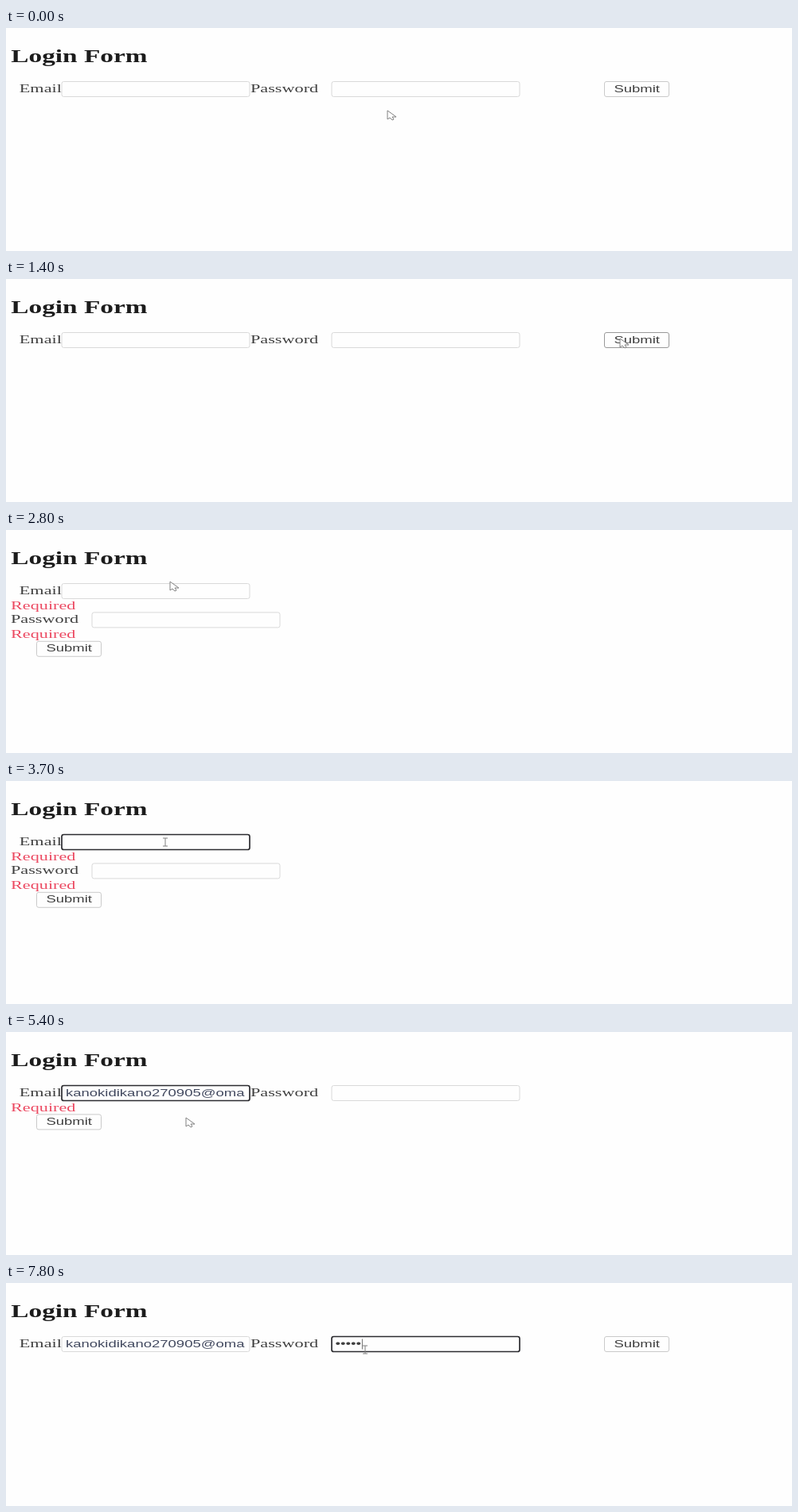
An HTML page with a canvas for the animation above (8 s loop, 987 by 281 pixels).

```html
<!DOCTYPE html>
<html lang="en">
<head>
<meta charset="utf-8">
<title>Login Form</title>
<style>
  html, body { margin: 0; width: 100%; height: 100%; overflow: hidden; background: #fefefe; }
  canvas { display: block; }
</style>
</head>
<body>
<canvas id="stage" width="987" height="281"></canvas>
<script>
const stage = document.getElementById('stage');
const ctx = stage.getContext('2d');
const LOOP = 8000, STEP = 100;
const SX = 1.388, SY = 0.92; // the whole page is shown wide
const SERIF = '"Liberation Serif", "Times New Roman", serif';
const SANS = '"Liberation Sans", Arial, sans-serif';
const TITLE = 'bold 24px ' + SERIF, BODY = '16px ' + SERIF, CONTROL = '13.333px ' + SANS;
const PAPER = '#fefefe', INK = '#404040', RED = '#ec4a62';

const LEFT = 6, TOP = 67.5, ROW = 18.2;
const BOX_H = 19, FIELD_W = 236, BUTTON_W = 81;
const EMAIL_X = 70, FIELD_GAP = 102;
const EMAIL = 'kanokidikano270905@oma';

const at = { hover: 1200, submit: 1900, email: 3200, fill: 4700, valid: 4800, password: 6200, typing: 7100 };

const home = { x: 479, y: 104 };
const move = (start, end, x, y) => ({ start, end, x, y });
const moves = [
  move(0, 800, 755, 97),
  move(1000, 1400, 771, 75),
  move(2400, 2600, 206, 65),
  move(2800, 3200, 200, 77),
  move(3700, 4400, 226, 108),
  move(5400, 5700, 416, 96),
  move(5900, 6400, 451, 84)
];
const arrowShape = new Path2D('M0 0V11L3 9L6 12L8 11L6 8H11Z');
const beamShape = new Path2D('M-3 -5H3M0 -5V5M-3 5H3');

function pointerAt(t) {
  return moves.reduce((p, m) => {
    const u = Math.min(1, Math.max(0, (t - m.start) / (m.end - m.start)));
    const k = u * u * (3 - 2 * u);
    return { x: p.x + (m.x - p.x) * k, y: p.y + (m.y - p.y) * k };
  }, home);
}

function text(str, x, y, font, color) {
  ctx.save();
  ctx.translate(x, y);
  ctx.scale(SX, SY);
  ctx.font = font;
  ctx.fillStyle = color;
  ctx.fillText(str, 0, 0);
  ctx.restore();
}

const label = (str, x, y, color = INK) => text(str, x, y + 13.5, BODY, color);
const value = (str, x, y, color = INK) => text(str, x, y + 13, CONTROL, color);

function box(x, y, w, color, line = 1) {
  ctx.beginPath();
  ctx.roundRect(x, y, w, BOX_H, 2.5);
  ctx.fillStyle = PAPER;
  ctx.fill();
  ctx.lineWidth = line;
  ctx.strokeStyle = color;
  ctx.stroke();
}

function field(x, y, focused) {
  box(x, y, FIELD_W, focused ? '#2b2b2f' : '#d9d9d9', focused ? 1.7 : 1);
}

function button(x, y, hover) {
  box(x, y, BUTTON_W, hover ? '#999' : '#cacaca');
  value('Submit', x + 11.9, y);
}

function pointer(shape, { x, y }) {
  ctx.save();
  ctx.translate(x, y);
  ctx.fillStyle = '#fff';
  ctx.fill(shape);
  ctx.lineWidth = 1;
  ctx.strokeStyle = '#808080';
  ctx.stroke(shape);
  ctx.restore();
}

function drawPassword(x, y, t) {
  const dots = Math.min(5, Math.max(0, Math.floor((t - at.typing) / STEP) + 1));
  const blinkOn = Math.floor((t - at.password) / 500) % 2 === 0;
  value('•'.repeat(dots), x + 4.6, y);
  if (dots || blinkOn) {
    ctx.font = CONTROL;
    ctx.fillStyle = '#707070';
    ctx.fillRect(x + 5.5 + ctx.measureText('•').width * SX * dots, y + 3, 1, 13);
  }
}

function draw(t) {
  const emailError = t >= at.submit && t < at.valid;
  const passError = t >= at.submit && t < at.typing;

  ctx.fillStyle = PAPER;
  ctx.fillRect(0, 0, stage.width, stage.height);
  text('Login Form', LEFT + 0.3, 43, TITLE, '#1c1c1c');

  label('Email', 16.8, TOP);
  field(EMAIL_X, TOP, t >= at.email && t < at.password);
  if (t >= at.fill) value(EMAIL, EMAIL_X + 5, TOP, '#42495f');

  // an error line pushes what follows onto a new row
  const passX = emailError ? LEFT : EMAIL_X + FIELD_W + 1;
  const passY = emailError ? TOP + 2 * ROW : TOP;
  const fieldX = passX + FIELD_GAP;
  if (emailError) label('Required', LEFT, TOP + ROW + 0.7, RED);
  label('Password', passX, passY);
  field(fieldX, passY, t >= at.password);
  if (t >= at.password) drawPassword(fieldX, passY, t);

  if (passError) {
    label('Required', LEFT, passY + ROW + 0.7, RED);
    button(38.5, passY + 2 * ROW, false);
  } else {
    button(751.5, TOP, t >= at.hover && t < at.submit);
  }

  const p = pointerAt(t);
  const inside = (x, y) => p.x > x && p.x < x + FIELD_W && p.y > y && p.y < y + BOX_H;
  const overField = inside(EMAIL_X, TOP) || inside(fieldX, passY);
  pointer(overField ? beamShape : arrowShape, p);
}

const start = performance.now();
function tick() {
  const t = (performance.now() - start) % LOOP;
  draw(Math.floor(t / STEP) * STEP);
  requestAnimationFrame(tick);
}
tick();
</script>
</body>
</html>
```
